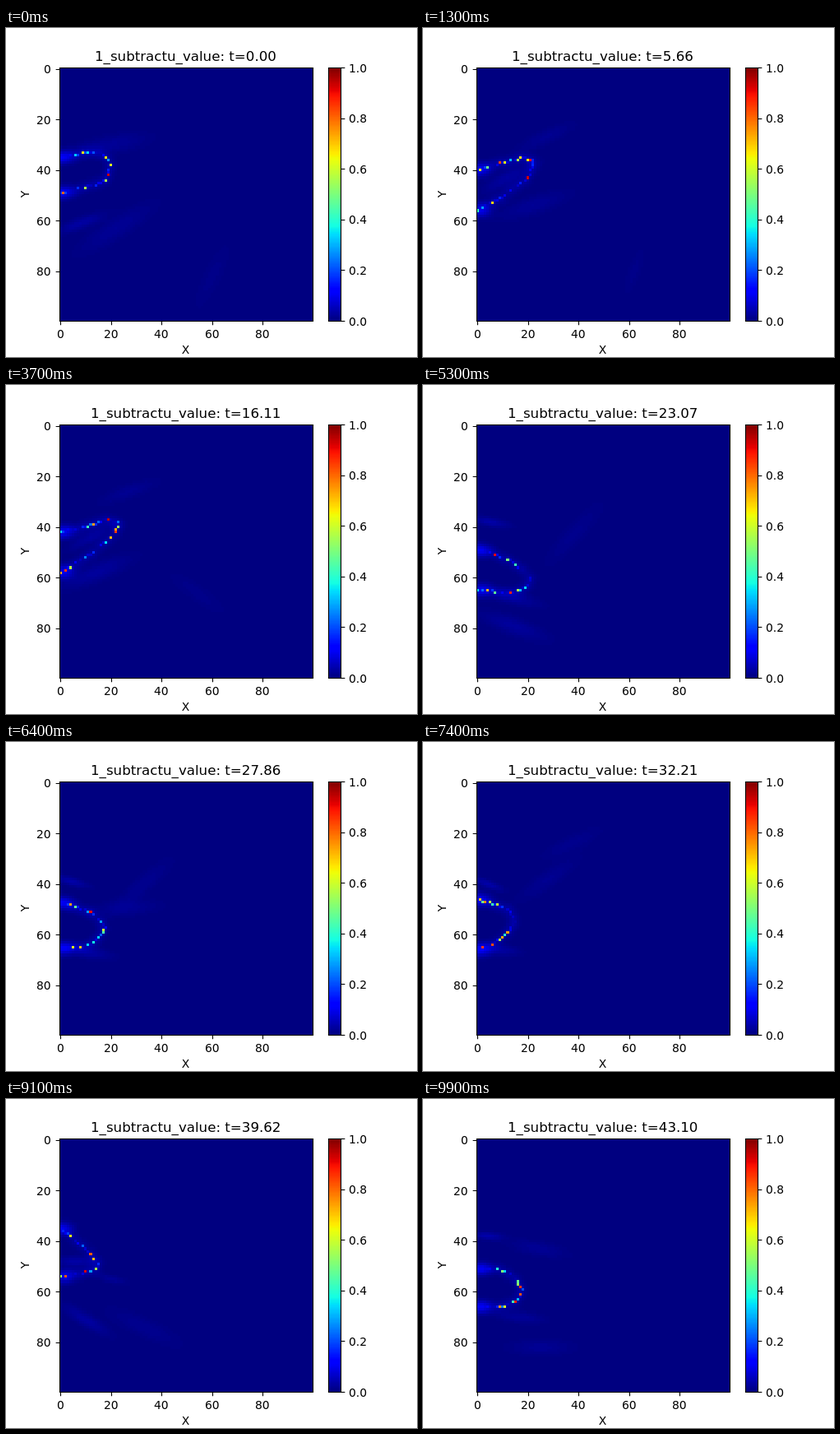
Recreate the animation shown at these times as an HTML page with a canvas. Size 500 by 400 pixels, loop 10000 ms.

```html
<!DOCTYPE html>
<html lang="en">
<head>
<meta charset="utf-8">
<title>Field animation</title>
<style>
  html, body { margin: 0; width: 100%; height: 100%; overflow: hidden; background: #fff; }
  canvas, svg { position: absolute; left: 0; top: 0; display: block; }
  text { font: 13.89px "DejaVu Sans", sans-serif; fill: #000; }
  #title { font-size: 16.67px; }
  path { fill: none; stroke: #000; stroke-width: 1.11; }
</style>
</head>
<body>
<canvas id="field" width="500" height="400"></canvas>
<svg id="axes" width="500" height="400" viewBox="0 0 500 400">
  <text id="title" y="40"></text>
  <text x="218.5" y="396" text-anchor="middle">X</text>
  <text transform="translate(28 202) rotate(-90)" text-anchor="middle">Y</text>
</svg>
<script>
const N = 100, CELL = 3.08, LEFT = 64.5, TOP = 48, SIZE = 308;
const FRAMES = 100, STEP = 100, DT = 0.435333;

// front: x, y from the upper wall round the tip to the lower wall
// streaks: x, y, length, degrees
const poses = [
  { at: 0,
    front: [[0,35], [10,33], [16,33], [20,37], [18,44], [13,46], [0,49]],
    streaks: [[20,30,14,-10], [8,61,9,-20], [22,63,16,-32], [60,82,14,-65]] },
  { at: 13,
    front: [[0,40], [10,37], [18,35], [22,36], [21,42], [11,50], [0,56]],
    streaks: [[27,27,11,-24], [12,43,11,-28], [22,54,14,-18], [62,80,10,-70]] },
  { at: 37,
    front: [[0,42], [10,40], [18,37], [23,38], [22,42], [13,50], [0,58]],
    streaks: [[27,26,11,-20], [12,44,9,-28], [14,58,14,-22], [54,66,13,35]] },
  { at: 53,
    front: [[0,49], [5,50], [13,53], [21,60], [19,64], [14,66], [0,65]],
    streaks: [[5,38,7,10], [15,68,10,15], [14,79,13,20], [38,43,15,-48]] },
  { at: 74,
    front: [[0,46], [7,48], [12,50], [15,55], [11,60], [6,64], [0,66]],
    streaks: [[4,40,6,20], [8,66,8,5], [37,24,12,-25], [28,38,13,-35]] },
  { at: 91,
    front: [[0,35], [5,39], [11,44], [15,49], [14,51], [8,53], [0,54]],
    streaks: [[20,55,6,12], [6,48,8,0], [10,71,10,32], [33,74,15,25]] },
  { at: 99,
    front: [[0,51], [8,51], [13,53], [18,59], [16,63], [10,66], [0,66]],
    streaks: [[4,38,6,4], [17,70,9,5], [25,82,12,0], [24,43,11,10]] }
];

const clamp = v => Math.max(0, Math.min(1, v));
const mix = (a, b, k) => Array.isArray(a) ? a.map((v, i) => mix(v, b[i], k)) : a + (b - a) * k;

function random(seed) {
  let s = seed * 7919 + 1;
  return () => {
    s = (s + 0x6D2B79F5) | 0;
    let z = Math.imul(s ^ (s >>> 15), 1 | s);
    z ^= z + Math.imul(z ^ (z >>> 7), 61 | z);
    return ((z ^ (z >>> 14)) >>> 0) / 4294967296;
  };
}

function jet(v) {
  const r = Math.min((v - .35) / .31, 1, 1 - .5 * (v - .89) / .11);
  const g = Math.min((v - .125) / .25, 1, (.91 - v) / .27);
  const b = Math.min(.5 + .5 * v / .11, 1, (.65 - v) / .31);
  return `rgb(${[r, g, b].map(c => Math.round(255 * clamp(c)))})`;
}
const palette = Array.from({ length: 256 }, (_, i) => jet(i / 255));
const colour = v => palette[Math.min(255, Math.floor(v * 256))];

// Axes
const svg = document.getElementById("axes");
function add(tag, attrs, label = "") {
  const el = document.createElementNS("http://www.w3.org/2000/svg", tag);
  for (const key in attrs) el.setAttribute(key, attrs[key]);
  el.textContent = label;
  svg.append(el);
  return el;
}

// Starts text on a whole pixel; share is the part of its width left of x
function align(el, x, share) {
  const width = Math.ceil(el.getComputedTextLength());
  el.setAttribute("x", Math.round(x - width * share));
}

const snap = v => Math.floor(v + .5) + .5;
const baseline = y => Math.floor(y + 6.05);
add("path", { d: "M65.5 48.5H373.5V356.5H65.5ZM392.5 48.5H407.5V356.5H392.5Z" });
for (let n = 0; n < N; n += 20) {
  const x = LEFT + (n + .5) * CELL, y = TOP + (n + .5) * CELL;
  add("path", { d: `M${snap(x)} 356.5v4.86M65.5 ${snap(y)}h-4.86` });
  align(add("text", { y: 377 }, n), x, .5);
  align(add("text", { y: baseline(y) }, n), 54.78, 1);
}
for (let n = 0; n <= 5; n++) {
  const y = TOP + SIZE * (1 - n / 5);
  add("path", { d: `M407.5 ${snap(y)}h4.86` });
  add("text", { x: 417, y: baseline(y) }, (n / 5).toFixed(1));
}

const ctx = document.getElementById("field").getContext("2d");
const title = document.getElementById("title");
for (let row = 0; row < SIZE; row++) {
  ctx.fillStyle = colour(1 - (row + .5) / SIZE);
  ctx.fillRect(392, TOP + row, 15, 1);
}

// Field
const grid = new Float32Array(N * N);

function addBlob(cx, cy, len, wid, deg, v) {
  const c = Math.cos(deg * Math.PI / 180), s = Math.sin(deg * Math.PI / 180);
  const reach = 2 * len;
  const from = m => Math.max(0, Math.ceil(m - reach));
  const to = m => Math.min(N - 1, Math.floor(m + reach));
  for (let y = from(cy); y <= to(cy); y++) {
    for (let x = from(cx); x <= to(cx); x++) {
      const u = ((x - cx) * c + (y - cy) * s) / len;
      const w = ((y - cy) * c - (x - cx) * s) / wid;
      grid[y * N + x] += v * Math.exp(-u * u - w * w);
    }
  }
}

// One point for each cell the front crosses
function trace(front) {
  const cells = [];
  front.slice(1).forEach((end, i) => {
    const start = front[i];
    const steps = Math.ceil(Math.max(Math.abs(end[0] - start[0]), Math.abs(end[1] - start[1])));
    for (let k = 0; k < steps; k++) cells.push(mix(start, end, k / steps).map(Math.round));
  });
  cells.push(front[front.length - 1].map(Math.round));
  return cells;
}

function buildField(front, streaks, rnd) {
  grid.fill(0);
  // Streaks fade away from the wall
  for (const [x, y, len, deg] of streaks) {
    addBlob(x, y, len, len / 4, deg, .008 + .035 * Math.exp(-x / 20));
  }
  for (const [x, y] of [front[0], front[front.length - 1]]) addBlob(x + 1, y, 4, 2.5, 0, .07);

  const cells = trace(front);
  cells.forEach(([x, y], i) => {
    if (i % 3 === 0) addBlob(x, y, 2.2, 2.2, 0, .025);
  });
  for (const [x, y] of cells) {
    const spark = rnd() < .4 ? .15 + .8 * rnd() ** 1.7 : .1 * rnd();
    const i = y * N + x;
    grid[i] = Math.max(grid[i], spark);
  }
}

function render(frame) {
  const next = Math.max(1, poses.findIndex(p => p.at >= frame));
  const a = poses[next - 1], b = poses[next];
  const ease = (1 - Math.cos(Math.PI * (frame - a.at) / (b.at - a.at))) / 2;
  buildField(mix(a.front, b.front, ease), mix(a.streaks, b.streaks, ease), random(frame));

  ctx.fillStyle = palette[0];
  ctx.fillRect(65, TOP, SIZE, SIZE);
  const edge = (start, n) => Math.round(start + n * CELL);
  grid.forEach((v, n) => {
    if (v < 1 / 256) return;
    const col = n % N, row = Math.floor(n / N);
    const x = edge(LEFT, col), y = edge(TOP, row);
    ctx.fillStyle = colour(v);
    ctx.fillRect(x, y, edge(LEFT, col + 1) - x, edge(TOP, row + 1) - y);
  });
  title.textContent = `1_subtractu_value: t=${(frame * DT).toFixed(2)}`;
  align(title, LEFT + SIZE / 2, .5);
}

let shown = -1;
const began = performance.now();
function tick() {
  const frame = Math.floor((performance.now() - began) / STEP) % FRAMES;
  if (frame !== shown) render(shown = frame);
  requestAnimationFrame(tick);
}
tick();
</script>
</body>
</html>
```
